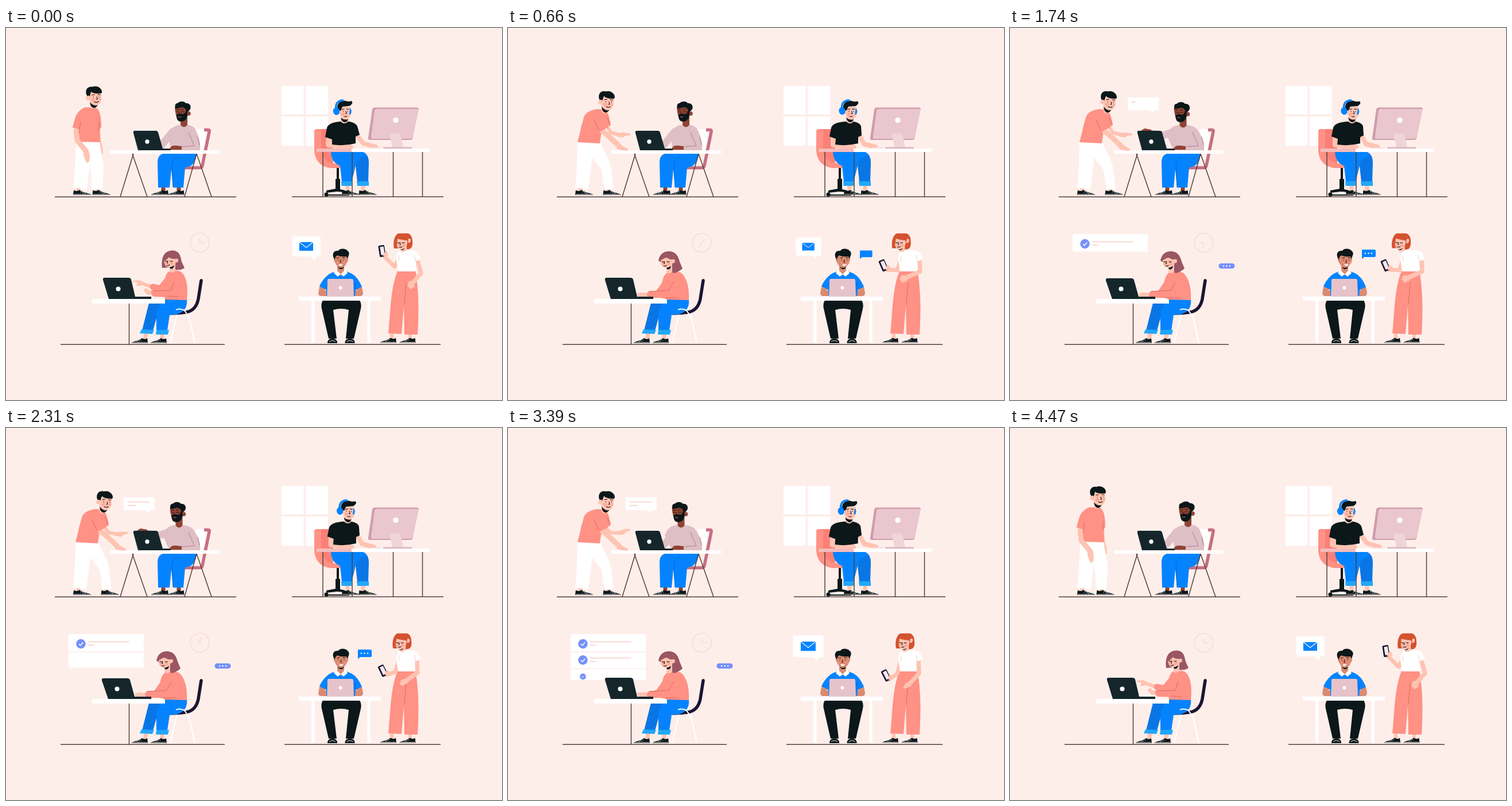
Recreate the animation shown at these times as an HTML page. Size 864 px wide and 648 px high, loop 4500 ms.

```html
<!DOCTYPE html>
<html lang="en">
<head>
<meta charset="utf-8">
<title>Office scenes</title>
<style>
html,body{margin:0;width:100%;height:100%;overflow:hidden;background:#feeeea}
svg{display:block;width:864px;height:648px}
.ink{fill:#0b1719}.blue{fill:#0583ff}.navy{fill:#0a76e6}.cuff{fill:#22a7f8}.coral{fill:#ff9185}.white{fill:#fff}
.skin{fill:#fec3b1}.dark{fill:#8f4433}.tan{fill:#d98b72}.mauve{fill:#dfbfc6}.peri{fill:#7590fb}
.limb,.line,.thin,.face,.note{fill:none;stroke-linecap:round;stroke-linejoin:round}
.limb.skin{fill:none;stroke:#fec3b1}.limb.coral{fill:none;stroke:#ff9185}
.limb.tan{fill:none;stroke:#d98b72}.limb.mauve{fill:none;stroke:#dfbfc6}
.line{stroke:#54403a;stroke-width:1.5;stroke-linecap:butt}
.thin{stroke-width:.9;stroke:#d9685f}
.face{stroke:#2a1513;stroke-width:1.1}
.blush{fill:#ff8e80;opacity:.6}
.note{stroke:#f4b9b0;stroke-width:1.1;stroke-linecap:butt}
</style>
</head>
<body>
<svg viewBox="0 0 864 648">
<defs>
  <g id="shoe">
    <path class="ink" d="M0 8.8L1 .5Q6 3.5 11 .2L18 4L27 6.2Q31 7.2 31 8.8Z"/>
    <path d="M12 4.5l3-2.4M15.5 6l3-2.2M19 7l2.6-1.7M1 7.8H30" stroke="#fff" stroke-width=".8"/>
  </g>
  <g id="front">
    <path class="ink" d="M0 8Q0 0 8.5 0T17 8Z"/>
    <path d="M3 5.5Q8.5 1.5 14 5.5" fill="none" stroke="#fff" stroke-width=".9"/>
  </g>
  <g id="tick">
    <circle class="peri" r="8.2"/>
    <path d="M-3.6 .2L-1 2.8L3.8 -2.4" fill="none" stroke="#fff" stroke-width="1.5"/>
  </g>
  <g id="dots" class="white"><circle cx="-5.5" r="1.2"/><circle r="1.2"/><circle cx="5.5" r="1.2"/></g>
  <clipPath id="crop"><path d="M600 357.7H800V560H600Z"/></clipPath>
</defs>

<!-- desk talk -->
<path class="line" d="M85 294.3H401"/>
<path class="white" d="M330 176H350L343 214H328Z"/>
<path d="M345 177.500H352Q355 177.500 354 181L342 240Q341 243.500 337 243.500H285" fill="none" stroke="#c66f82" stroke-width="5.5"/>
<path class="limb" stroke="#8f4433" stroke-width="7" d="M274 272V286M301 272V286"/>
<use href="#shoe" transform="translate(283 282) scale(-.97 1)"/>
<use href="#shoe" transform="translate(310.500 282) scale(-.92 1)"/>
<path class="blue" d="M264 234Q264 219 278 218H332Q331 241 312 243L309 278H291L288 246L285 278H265Z"/>
<path class="thin" style="stroke:#0562c4" d="M291 277L289 240Q289 228 300 224"/>
<path class="limb mauve" stroke-width="13" d="M290 181L278 196L270 205" data-k="reach" data-to="M285 181L267 187L246 184"/>
<path class="dark" d="M262 200L270 201L270 208L260 208L258 205Z" data-k="reach" data-to="M246 177L248 184L232 183L228 179L234 175Z"/>
<path class="mauve" d="M303 169C291 170 286 176 283 186L287 213H338Q340 200 332 181Q328 170 318 169Z" data-k="nod" data-to="M294 169C282 170 277 177 273 187L285 213H338Q340 198 328 179Q322 170 308 169Z"/>
<path class="thin" style="stroke:#a8798a" d="M318 182L328 205L307 207M334 190L337 204"/>
<path class="dark" d="M286 209Q288 204 298 205L306 206V212H286Z"/>
<g transform="translate(0 0)" data-k="nod" data-to="translate(-8.500 1)">
  <path class="dark" d="M304 158V169Q310 176 316 169V155Z"/>
  <path class="dark" d="M294 138H316V153Q311 161 302 160Q295 156 294 138Z"/>
  <circle class="dark" cx="318" cy="149" r="3.800"/>
  <path class="ink" d="M296.500 151Q302 148 308 150Q312 150 313 144H316V153Q314 163 304 163Q297 163 296.500 151Z"/>
  <path class="ink" d="M295 140C293 132 297 131 299 131C303 126 312 128 313 131C320 130 323 136 321 141Q319 145 316 146L313 142Q311 138 306 138Q299 140 295 140Z"/>
  <path class="face" d="M297 146h4M305 146h5M302 147l-1 4M297 142l4 .5M305 142l4 -.5"/>
  <path d="M299.500 155h6" stroke="#c96c5c"/>
</g>
<path class="line" d="M222 219L199 294M220 219L246 294M332 219L311 294M332 219L358 294"/>
<path class="white" d="M181 213H371V219H181Z"/>
<path d="M224 179H261Q264 179 265 182L273 210H287V213H230L222 183Q221 179 224 179Z" fill="#14262a"/>
<circle class="white" cx="246" cy="198" r="3.7"/>
<g>
  <path class="limb skin" stroke-width="7" d="M126 276V287M159 276V287" data-k="lean" data-to="M126 276V287M175 276V287"/>
  <use href="#shoe" x="117" y="282"/>
  <g transform="translate(150.5 282)" data-k="lean" data-to="translate(165.5 282)"><use href="#shoe"/></g>
  <g transform="rotate(0 181 182)" data-k="point" data-to="rotate(-28 181 182)">
    <path class="limb skin" stroke-width="6" d="M161 172L162 196L166 212" data-k="lean" data-to="M170 168L179 182L194 186"/>
    <path class="skin" d="M164 207L168 213L169 219L167 220L165 215L163 218L162 210Z" data-k="lean" data-to="M190 183L203 182L213 184L213 186.500L204 188L200 191L190 189Z"/>
  </g>
  <path class="white" d="M122 198Q121 245 117 278L141 281L146 236L148 252L150 281L168 281L170 240L163 198Z" data-k="lean" data-to="M121 198Q121 245 117 278L140 281L147 226L163 247L168 281L184 281L178 236L160 198Z"/>
  <path class="coral" d="M138 138C128 142 122 150 120 158L116 173L128 177L122 198L164 199L163 176L166 173C166 156 164 143 157 139Z" data-k="lean" data-to="M156 141C143 143 134 148 132 156L127 174L126 180L121 199L160 201L163 180L179 169C177 156 174 147 170 143Z"/>
  <path class="limb skin" stroke-width="9" d="M122 178L124 196L139 214" data-k="lean" data-to="M164 179L176 189L193 205"/>
  <path class="skin" d="M135 210L144 213L146 223L145 233L140 235L135 222Z" data-k="lean" data-to="M189 203L197 204L208 210L209 214L198 213L190 211Z"/>
  <path class="coral" d="M122 154L116 173L129 177L134 158Z" data-k="lean" data-to="M150 152L157 182L174 173L166 154Z"/>
  <path class="thin" d="M130 164L127 182M162 163L162 178" data-k="lean" data-to="M150 160L158 178M172 155L178 168"/>
  <g transform="translate(0 0) rotate(0 152 130)" data-k="lean" data-to="translate(17 8) rotate(6 152 130)">
    <path class="skin" d="M147 127V139Q152 143 157 138V127Z"/>
    <path class="ink" d="M146 129Q151 136 160 134Q157 140 152 139Q147 137 146 129Z"/>
    <path class="skin" d="M143 112H165Q167 121 165 129Q162 135 156 135Q148 134 145 126Z"/>
    <circle class="skin" cx="143" cy="122" r="3.7"/>
    <path class="ink" d="M140 116C137 106 144 101 151 102.500C158 99 168 105 167 112Q167 114 164 114Q154 115 148 111L146 119Q143 116 142 119Z"/>
    <circle class="blush" cx="152" cy="125" r="2.6"/><circle class="blush" cx="164" cy="124" r="2"/>
    <path class="face" d="M152 120.500h.5M162 120h.5M150 117l4 -1M160 116l4 .5M158 120l1.500 4l-2 .3M154 128.500Q158 131 161 128"/>
  </g>
</g>
<g transform="translate(233 134) scale(0)" data-k="talk" data-to="translate(233 134) scale(1)">
  <path class="white" d="M-25 -13H23Q26 -13 26 -10V6Q26 9 23 9H18L17 14.500L10 9H-25Q-28 9 -28 6V-10Q-28 -13 -25 -13Z"/>
  <path class="note" d="M-21 -5H-21" data-k="talkA" data-to="M-21 -5H17"/>
  <path class="note" d="M-21 1H-21" data-k="talkB" data-to="M-21 1H-7"/>
</g>

<!-- headphones -->
<path class="line" d="M498 294H762"/>
<path class="white" d="M480 101h38.500v49.500h-38.500zM522 101h39v49.500h-39zM480 154h38.500v51h-38.500zM522 154h39v51h-39z"/>
<path class="coral" d="M541 176H570V236H608Q608 244 600 244H566C548 242 537 230 537 212V180Q537 176 541 176Z"/>
<path d="M549 177H570V236H580C562 237 549 228 549 212Z" fill="#fa8077"/>
<path class="ink" d="M576 244h4v19h2v18q14 2 16 8h-4q-6-4-18-4l-18 2v-4l16-3v-17h2z"/>
<circle class="ink" cx="558" cy="290" r="3.600"/><path class="ink" d="M560 290h38v2h-38z"/>
<path class="limb skin" stroke-width="7" d="M595 272V286M622 272V286"/>
<use href="#shoe" x="585" y="282"/><use href="#shoe" x="614.500" y="282"/>
<path class="navy" d="M590 214H616Q632 217 632 234L631 268H612L609 240Z"/>
<path class="blue" d="M566 214H592Q610 222 609 240L602 268H585L582 240Q566 234 566 214Z"/>
<path class="blue" d="M590 214H616Q625 216 629 222Q612 224 609 240L596 226Z"/>
<path class="cuff" d="M584 267h18.500l-.5 8h-17.500zM611 267h21v8h-20z"/>
<path class="limb skin" stroke-width="8" d="M611 186L622 201L644 207" data-k="sway" data-to="M612 186L620 202L640 207"/>
<path class="limb skin" stroke-width="10" d="M563 188L562 203L600 208" data-k="sway" data-to="M567 188L567 203L602 208"/>
<path class="ink" d="M582 163C570 164 561 167 559 174L556 190L568 194L568 203Q588 206 609 201L609 189L616 186L612 171Q609 165 598 163Z" data-k="sway" data-to="M587 163C574 164 565 167 563 174L560 189L571 193L570 203Q590 206 610 201L610 190L616 187L615 171Q613 165 602 163Z"/>
<g transform="translate(0 0) rotate(0 590 160)" data-k="sway" data-to="translate(6 0) rotate(2 590 160)">
  <path class="skin" d="M584 155V164Q590 169 596 163V155Z"/>
  <path class="ink" d="M583 156Q588 161 596 159Q594 165 589 164Q584 162 583 156Z"/>
  <path class="skin" d="M580 137H600Q602 146 600 153Q597 160 591 159Q584 158 581 150Z"/>
  <path class="ink" d="M578 144C575 132 581 127 590 126.500Q596 129 602 127L603.500 130Q601 136 596 136L586 137L583 144Z"/>
  <path d="M575.500 142C573 132 578 126 588 126" fill="none" stroke="#0583ff" stroke-width="3.600"/>
  <ellipse class="blue" cx="575.500" cy="145" rx="5.600" ry="6.600" transform="rotate(-12 575.500 145)"/>
  <path class="blue" d="M599 139Q604 144 600 151L598 150Z"/>
  <circle class="blush" cx="587" cy="150" r="2.500"/>
  <path class="face" d="M587 145h.5M595 145h.5M585 142l4 -1M593 141l4 .5M592 145l1.500 4l-2 .3M589 154q3 1 5 -.5"/>
</g>
<path d="M642 138.500H716Q719.500 139 718.500 142L708 192Q707 195 704 195H634Q630 195 631 191L638 142Q639 138.500 642 138.500Z" fill="#cf9dab"/>
<path d="M646 141H716Q719 141 718 144L708 190Q707 193 704 193H639Q635 193 636 189L642 144Q643 141 646 141Z" fill="#eac7cf"/>
<circle class="white" cx="679" cy="160.500" r="4.800"/>
<path d="M668 184H687L692 208H673Z" fill="#efd5da"/>
<path d="M657 207.500h50v2.500h-50z" fill="#d9b4be"/>
<path d="M634 208h19v2h-19z" fill="#f4dde0"/>
<path class="white" d="M541 210H738V216H541Z"/>
<path d="M541 210H602V216H541Z" fill="#f2bcbb"/>
<path class="line" d="M552 216V294M603 216V294M674.500 216V294M725.500 216V294"/>

<!-- task list -->
<path class="line" d="M95 551.300H381"/>
<g fill="none" stroke="#f4d6cf" stroke-width="1.200">
  <circle cx="337.500" cy="374" r="16.500"/>
  <path d="M337.500 374V366.500" transform="rotate(0 337.500 374)" data-k="clock" data-to="rotate(360 337.500 374)"/>
  <path d="M337.500 374H348" transform="rotate(0 337.500 374)" data-k="clock" data-to="rotate(1080 337.500 374)"/>
</g>
<g transform="translate(377.500 414.500) scale(0)" data-k="pill" data-to="translate(377.500 414.500) scale(1)">
  <rect class="peri" x="-14" y="-4.600" width="28" height="9.200" rx="4.600"/><use href="#dots"/>
</g>
<g id="list" transform="translate(174.500 405) scale(1) translate(-174.500 -405)" data-k="clear" data-to="translate(174.500 405) scale(0) translate(-174.500 -405)"></g>
<path d="M286 549L298 499Q301 490 307 490Q316 490 319 503L329 549" fill="none" stroke="#fff" stroke-width="2.200"/>
<path d="M340 440L335 472Q331 492 314 495Q300 497.500 283 497" fill="none" stroke="#191532" stroke-width="5.500" stroke-linecap="round"/>
<path class="limb skin" stroke-width="7" d="M244 530L242 544M272 530V544"/>
<use href="#shoe" transform="translate(247 540) scale(-.9 1)"/><use href="#shoe" transform="translate(280 540) scale(-.9 1)"/>
<path class="navy" d="M249 479H280L262 506L256 527H237Z"/>
<path class="blue" d="M266 476L277 472H315C317 488 308 497 296 499L285 500L281 527H262V500Q262 488 270 480Z"/>
<path class="cuff" d="M236 525L258 526L255 533L233 532ZM262 526H284L282 534H261Z"/>
<path d="M296 491Q301 488 309 491Q315 495 319 507" fill="none" stroke="#fff" stroke-width="2"/>
<path class="white" d="M150 472H277V480H150Z"/>
<path class="line" d="M214.500 480V551"/>
<g transform="translate(0 0)" data-k="typing" data-to="translate(0 1.200)">
  <path class="limb skin" stroke-width="6" d="M256 452L240 446L231 443" data-k="type" data-to="M256 464L242 465L234 465"/>
  <path class="skin" d="M240 443L232 439L221 440L221 442L230 444L226 449L235 449Z" data-k="type" data-to="M244 461L236 460L226 461L224 464L227 467L232 468L242 468Z"/>
  <path class="limb coral" stroke-width="11" d="M284 436L269 454L256 451" data-k="type" data-to="M278 438L262 461L252 464"/>
</g>
<path class="coral" d="M284 424C277 428 276 440 274 452L277 473L315 474C317 455 316 440 309 429Q305 423 298 423Z" data-k="type" data-to="M277 426C269 432 268 445 266 456L275 473L315 474C316 456 313 440 305 430Q301 424 291 424Z"/>
<path class="limb skin" stroke-width="7" d="M262 461L248 461L244 457" data-k="type" data-to="M252 465L240 465L231 464"/>
<path class="limb coral" stroke-width="12" d="M301 444L292 463L259 462" data-k="type" data-to="M298 444L289 464L248 464"/>
<path class="thin" d="M293 442L288 457L253 458M300 468L281 467" data-k="type" data-to="M288 442L280 457L246 459M297 470L270 470"/>
<g transform="translate(0 0)" data-k="type" data-to="translate(-9 1)">
  <path d="M272 418C270 400 275 388 290 387.500C303 388 304 398 306 407L311 418Q303 423 294 421L284 417Z" data-k="type" data-to="M271 404C273 394 279 388 289 388C302 388 306 398 308 406L313 418Q305 425 297 426L290 418Z" fill="#9a5663"/>
  <path class="skin" d="M285 412V425Q290 429 295 423V408Z"/>
  <path class="ink" d="M284 415L293 413Q292 421 286 419Z"/>
  <path class="skin" d="M276 400L296 398V408Q294 416 284 417Q276 416 275 406Z"/>
  <circle class="skin" cx="296.500" cy="405" r="3.500"/>
  <path d="M274 407Q274 392 287 391Q296 391 297 402Q288 403 284 399Q280 404 274 407Z" data-k="type" data-to="M271 404Q276 392 287 391Q296 391 297 402Q290 403 284 398Q279 403 271 404Z" fill="#9a5663"/>
  <circle class="blush" cx="289" cy="410" r="2.400"/><circle class="blush" cx="277.500" cy="410" r="1.800"/>
  <path class="face" d="M277 406q2 1 4 0M286 406q2 1 4 0M282 406l-1.500 3.500l1.500 .3M280 413q3 1.500 5 -.5"/>
</g>
<path d="M172 435H213Q217 435 218 438L225 468H253V472H179L169 439Q168 435 172 435Z" data-k="shake" data-to="M170 436H211Q215 436 216 439L224 468H253V472H178L167 440Q166 436 170 436Z" fill="#14262a"/>
<circle class="white" r="4" transform="translate(195.500 454.500)" data-k="shake" data-to="translate(193.500 454.500)"/>

<!-- messages -->
<path class="line" d="M485 551.300H757"/>
<g transform="translate(524 384) scale(1)" data-k="mail" data-to="translate(524 384) scale(0)">
  <path class="white" d="M-22 -21H21Q24 -21 24 -18V11Q24 14 21 14H17L13 20L7 14H-22Q-25.500 14 -25.500 11V-18Q-25.500 -21 -22 -21Z"/>
  <path class="blue" d="M-13 -11H11V4H-13Z"/><path d="M-13 -11L-1 -1.500L11 -11" fill="none" stroke="#fff" stroke-width="1.100"/>
</g>
<g transform="translate(613 402) scale(0)" data-k="chat" data-to="translate(613 402) scale(1)">
  <path class="blue" d="M1 -16H22Q24 -16 24 -14V-5Q24 -3 22 -3H4L0 .5V-15Q0 -16 1 -16Z"/>
  <g transform="translate(11.500 -9.500) scale(0)" data-k="chatDots" data-to="translate(11.500 -9.500) scale(1)"><use href="#dots"/></g>
</g>
<path class="tan" d="M566 536h5v8h-5zM597 536h5v8h-5z"/>
<use href="#front" x="560" y="541"/><use href="#front" x="590.500" y="541"/>
<path class="white" d="M532 474h5.500v75h-5.500zM629.500 474h5v75h-5z"/>
<path class="ink" d="M552 474H616Q620 481 618 489L606 541H592L597 491Q584 487 570 491L576 541H562L550 489Q548 481 552 474Z"/>
<path class="limb tan" stroke-width="10" d="M551 452L549 462H562M615 452L617 462H604"/>
<path class="blue" d="M574 424C562 427 552 436 546 450L558 456V467H608L609 456L620 451C614 436 606 427 592 424Z"/>
<path class="thin" style="stroke:#0562c4" d="M560 444L558 456M607 444L609 456"/>
<path class="tan" d="M577 412V424L583 431L589 424V412Z"/>
<path class="ink" d="M577 416Q583 419 589 416Q587 421 582 420Z"/>
<path class="white" d="M575 421L583 429L591 421L595 427L588 433L583 429L578 433L571 427Z"/>
<path class="tan" d="M573 394H594V408Q591 417 584 417.500Q576 417 573 408Z"/>
<path class="tan" d="M571 401h4v8q-4 0-4-8zM596 401h-4v8q4 0 4-8z"/>
<g transform="translate(0 0)" data-k="look" data-to="translate(3 0)">
  <circle class="blush" cx="577" cy="409" r="2.300"/><circle class="blush" cx="590" cy="409" r="2.300"/>
  <path class="face" d="M578 404h.5M587.500 404h.5M576 400.500l4 -.5M586 400l4 .5M583 404l-1 4l1.500 .3"/>
  <path class="white" d="M579 411.500H587Q585 414.500 582.500 414.500Q580 414 579 411.500Z"/>
</g>
<path class="ink" d="M571.500 402C567 393 571 387 579 388C582 383 592 384 595 388Q599 391 597 396L595 402L593 398Q583 399 577 396L574 399L573 403Z"/>
<path d="M562 437H602Q605 437 605 440L606 468H559L560 440Q560 437 562 437Z" fill="#e6c3ca"/>
<circle class="white" cx="582.500" cy="452.500" r="2.900"/>
<path class="white" d="M510 468H653V475H510Z"/>

<path class="limb skin" stroke-width="6" d="M672 528V544M704 528V544"/>
<use href="#shoe" transform="translate(680 539.500) scale(-.9 1)"/><use href="#shoe" transform="translate(713.500 539.500) scale(-.9 1)"/>
<path class="coral" d="M683 421H713C718 450 720 480 717 534H694L693 484L689 533L666 532C670 490 670 450 683 421Z"/>
<path class="thin" d="M694 480L697 444"/>
<path class="limb skin" stroke-width="7" d="M685 400L677 416L659 398" data-k="phone" data-to="M685 402L678 422L660 421|M685 402L678 428L664 438|M685 400L677 416L659 398"/>
<path class="white" d="M690 387C682 389 680 394 680 404L683 424H714V406L722 403L717 391Q712 387 702 387Z"/>
<path class="limb skin" stroke-width="7.500" d="M717 406L723 427L706 447" data-k="phone" data-to="M717 406L718 424L689 437|M715 406L716 428L697 448|M717 406L723 427L706 447"/>
<path class="skin" d="M710 440L702 441L699 448L704 455L712 451Z" data-k="phone" data-to="M694 431L685 431L682 437L687 444L696 440|M700 441L692 445L688 453L692 454L703 449|M710 440L702 441L699 448L704 455L712 451"/>
<path class="white" d="M710 389Q719 388 722 403L712 407Z"/>
<path class="thin" style="stroke:#e3cfd0" d="M711 396L714 407M685 397L684 406"/>
<g transform="translate(655 388.500) rotate(-9)" data-k="phone" data-to="translate(654 413.500) rotate(-24)|translate(658.500 431) rotate(-27)|translate(655 388.500) rotate(-9)">
  <rect x="-5.300" y="-10" width="10.600" height="20" rx="1.800" fill="#191532"/>
  <rect x="-2.600" y="-7.500" width="6.500" height="14.500" fill="#f6e9ec"/>
  <path class="skin" d="M3 4L8 2L10 9L5 12L0 8Z"/>
</g>
<g clip-path="url(#crop)">
  <g transform="translate(0 0) rotate(0 692 384)" data-k="tilt" data-to="translate(-7.500 0) rotate(2 692 384)">
    <path d="M677 384C674 366 678 356 692 356C705 356 708 364 708 372Q709 380 705 384Q698 387 692 384Z" fill="#d4522f"/>
    <path class="skin" d="M687 378V388Q692 393 698 387V376Z"/>
    <path class="ink" d="M685 382L695 380Q694 389 687 386Z"/>
    <path class="skin" d="M680 367H699V376Q696 385 688 386Q681 384 680 376Z"/>
    <path class="skin" d="M701 367Q706 366 705 371Q704 375 700 374Z"/>
    <path d="M676 384C673 366 680 358 690 358Q701 360 699 370Q688 369 682 367L680 384Z" fill="#d4522f"/>
    <circle class="blush" cx="693" cy="379" r="2.500"/><circle class="blush" cx="682.500" cy="379" r="1.700"/>
    <path class="face" d="M682 374q2 1 3.500 0M690 374q2 1 4 0M687 374l-1 3.500l1.500 .3M685 381.500q2.500 1 5 -.5"/>
  </g>
</g>
</svg>
<script>
const LOOP = 4500, NUM = /-?\d*\.?\d+/g;

// time value pairs, eased between neighbours
const tracks = {
  lean: [60, 0, 620, 1, 3400, 1, 3840, 0],
  point: [2160, 0, 2760, 1, 2970, 1, 3480, .5, 3780, 0],
  nod: [1050, 0, 1450, 1, 3690, 1, 4260, 0],
  reach: [1050, 0, 1500, 1, 2950, 1, 3300, 0],
  talk: [1380, 0, 1560, 1.06, 1680, 1, 2730, 1, 2910, .93, 3090, 1.1, 3240, 1, 3480, 1, 3690, 0],
  talkA: [1650, 0, 2000, 1],
  talkB: [1980, 0, 2300, 1],
  sway: [60, 0, 600, 1, 1800, 1, 2910, .85, 3300, .75, 4020, .06, 4470, 0],
  type: [60, 0, 600, 1, 3600, 1, 4260, 0],
  shake: [1200, 0, 1500, 1, 3000, 1, 3240, 0],
  card0: [900, 0, 1110, 1], dot0: [1080, 0, 1260, 1], row0: [1230, 0, 1620, 1],
  card1: [2100, 0, 2340, 1], dot1: [2300, 0, 2460, 1], row1: [2430, 0, 2820, 1],
  card2: [3270, 0, 3480, 1], dot2: [3300, 0, 3450, 1], row2: [3450, 0, 3780, 1],
  clear: [3870, 0, 4200, 1],
  pill: [900, 0, 1080, 1.1, 1170, 1, 4050, 1, 4230, 0],
  mail: [615, 0, 840, 1, 3210, 1, 3390, -.08, 3510, 0],
  chat: [540, 0, 690, 1, 3120, 1, 3300, 0],
  chatDots: [750, 0, 930, 1],
  look: [60, 0, 560, 1, 2000, 1, 2500, 0],
  phone: [60, 0, 600, 1, 2000, 1, 2600, 2, 3420, 2, 3880, 3],
  tilt: [60, 0, 600, .9, 1110, .9, 1560, 1.4, 1800, 1.4, 2500, 0]
};

const list = document.getElementById('list');
[[359, 389.5, 376], [391, 418.5, 404.3], [420, 451, 433]].forEach(([top, end, y], i) => {
  const from = i ? `M109 ${top}H240V${top}H109Z` : 'M174 374H175V375H174Z';
  list.innerHTML += `
    <path class="white" d="${from}" data-k="card${i}" data-to="M109 ${top}H240V${end}H109Z"/>
    <g transform="translate(130.500 ${y}) scale(0)" data-k="dot${i}" data-to="translate(130.500 ${y}) scale(1)"><use href="#tick"/></g>
    <path class="note" d="M143 ${y - 3.5}H143M143 ${y + 2.2}H143" data-k="row${i}" data-to="M143 ${y - 3.5}H214.5M143 ${y + 2.2}H154"/>`;
});

const parts = [...document.querySelectorAll('[data-k]')].map(el => {
  const attr = el.hasAttribute('transform') ? 'transform' : 'd';
  return { el, attr, key: el.dataset.k, poses: [el.getAttribute(attr), ...el.dataset.to.split('|')] };
});

function value(keys, t) {
  if (t <= keys[0]) return keys[1];
  for (let i = 2; i < keys.length; i += 2) {
    if (t < keys[i]) {
      const u = (t - keys[i - 2]) / (keys[i] - keys[i - 2]);
      return keys[i - 1] + (keys[i + 1] - keys[i - 1]) * u * u * (3 - 2 * u);
    }
  }
  return keys[keys.length - 1];
}

function mix(poses, p) {
  const i = Math.max(0, Math.min(Math.floor(p), poses.length - 2));
  const next = poses[i + 1].match(NUM);
  let n = 0;
  return poses[i].replace(NUM, v => (+v + (next[n++] - v) * (p - i)).toFixed(2));
}

function clockTurn(t) {
  const u = Math.min(t / 3390, 1), a = u ** 2.16;
  return a / (a + .363 * (1 - u) ** 2.16);
}

function draw() {
  const t = performance.now() % LOOP, now = {};
  for (const k in tracks) now[k] = value(tracks[k], t);
  now.clock = clockTurn(t);
  now.typing = now.type > .98 ? Math.sin(t / 45) : 0;
  for (const { el, attr, key, poses } of parts) el.setAttribute(attr, mix(poses, now[key]));
  requestAnimationFrame(draw);
}
draw();
</script>
</body>
</html>
```
